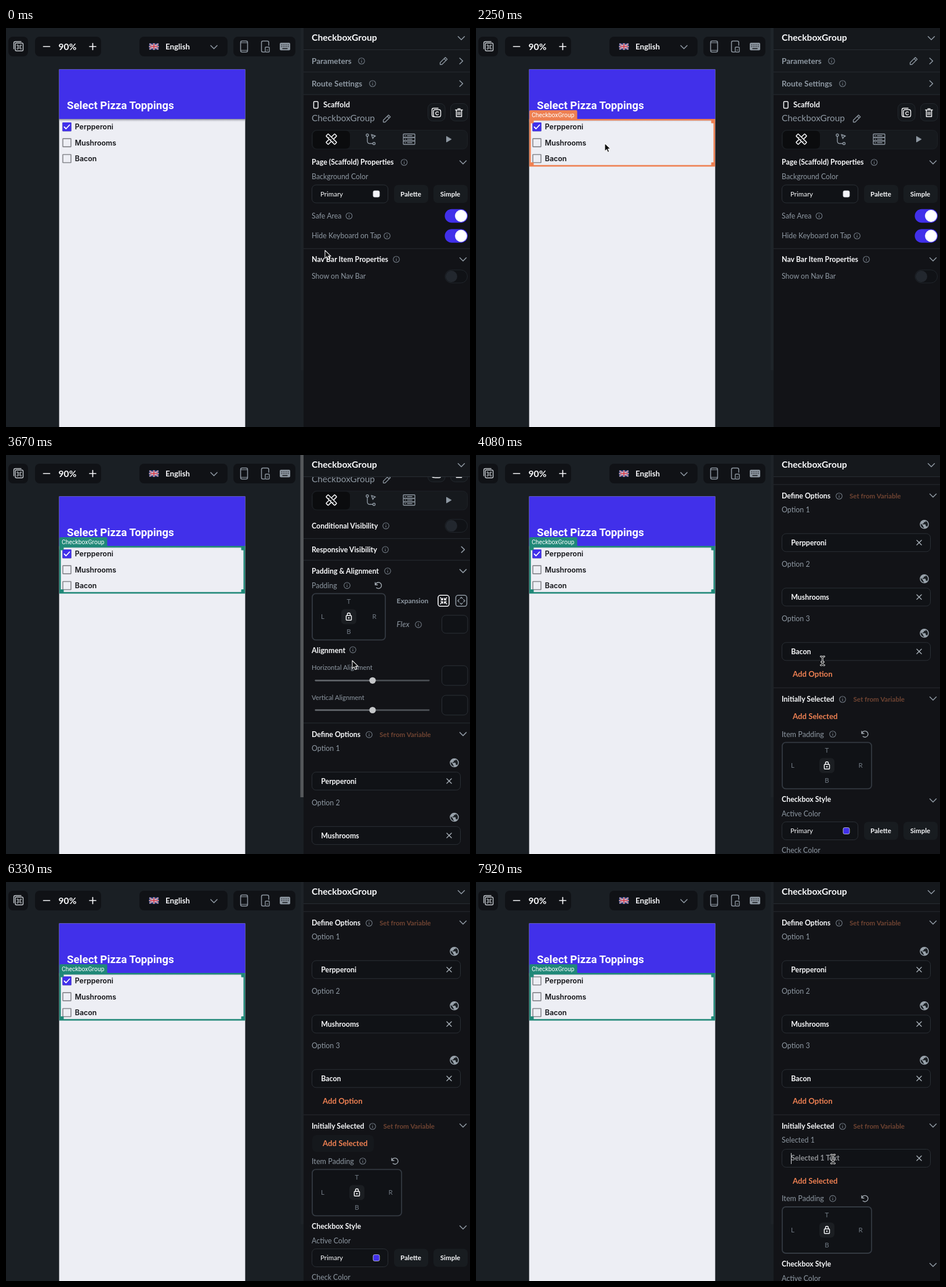
Write an HTML page that moves like this. It is 800 px wide and 689 px high and loops after 8000 ms.

```html
<!DOCTYPE html>
<html lang="en">
<head>
<meta charset="utf-8">
<title>Checkbox group editor</title>
<style>
  html, body { margin: 0; width: 100%; height: 100%; overflow: hidden; background: #1a1f24; }
  svg { display: block; width: 100vw; height: 100vh; }
  text { font-family: Lato, sans-serif; white-space: pre; }
  .bold { font-weight: 700; }
  .italic { font-style: italic; }
  .title { font-family: Roboto, sans-serif; font-weight: 700; }
  .tag { font-family: Roboto, sans-serif; }
  .item { font-family: Inter, sans-serif; font-weight: 600; }
</style>
</head>
<body>
<svg id="stage" viewBox="0 0 800 689" preserveAspectRatio="none"></svg>
<script>
const LOOP = 8000, STEP = 1000 / 12;
const WHITE = '#f8f9fb', GRAY = '#8e98a2', DIM = '#727b85', LINE = '#282d33';
const BLUE = '#4130ea', ORANGE = '#ee8052', TEAL = '#208878';
const PANEL = '#121317', DARK = '#101216', RAISED = '#181c20';

// Drawing helpers; text is placed by its left edge and vertical middle.
const text = (x, y, s, size, fill = WHITE, cls = 'bold', anchor = 'start') =>
  `<text x="${x}" y="${y + size * .355}" font-size="${size}" fill="${fill}" class="${cls}" text-anchor="${anchor}">${s}</text>`;
const box = (x, y, w, h, r = 0, fill = 'none', stroke = 'none', sw = 1) =>
  `<rect x="${x}" y="${y}" width="${w}" height="${h}" rx="${r}" fill="${fill}" stroke="${stroke}" stroke-width="${sw}"/>`;
const dot = (x, y, r, fill, stroke = 'none', sw = 1) =>
  `<circle cx="${x}" cy="${y}" r="${r}" fill="${fill}" stroke="${stroke}" stroke-width="${sw}"/>`;
const path = (d, stroke = GRAY, sw = 1.4, fill = 'none') =>
  `<path d="${d}" stroke="${stroke}" stroke-width="${sw}" fill="${fill}" stroke-linecap="round" stroke-linejoin="round"/>`;
const group = (id, inner) => `<g id="${id}">${inner}</g>`;
const at = (x, y, inner, more = '') => `<g transform="translate(${x} ${y}) ${more}">${inner}</g>`;

const heading = (x, y, s) => text(x, y, s, 12.4);
const label = (x, y, s, size = 12.4) => text(x, y, s, size, GRAY, '');
const rule = y => box(513, y - .5, 287, 1, 0, LINE);
const chevronDown = (x, y, c = GRAY) => path(`M${x - 5.5} ${y - 2.7}l5.5 5.5l5.5-5.5`, c, 1.6);
const chevronRight = (x, y) => path(`M${x - 2.7} ${y - 5}l5.2 5l-5.2 5`, GRAY, 1.6);
const info = (x, y) => dot(x, y, 5.3, 'none', DIM, 1.1) + path(`M${x} ${y - .3}v2.6M${x} ${y - 2.5}v.1`, DIM, 1.2);
const pencil = (x, y) => at(x, y, path('M-6 6v-3.2L3-6.2L6.2-3L-2.8 6ZM1-4L4-1', GRAY, 1.3));
const cross = (x, y) => path(`M${x - 4} ${y - 4}l8 8m0-8l-8 8`, '#aab2ba', 1.4);
const undo = (x, y) => at(x, y, path('M-5.5-5v4h4M-5-1.4A5.3 5.3 0 1 1-3.3 4', '#a4acb4', 1.4));
const field = (x, y, w, h) => box(x + .5, y + .5, w - 1, h - 1, 7, DARK, '#2b3036');
const globe = (x, y) => dot(x, y, 7.8, '#98a2ab') + at(x, y,
  path('M-1 8C-5 7.5-8 4-8 0L-7.8-1.8L-3 3V4Q-3 6-1 6ZM5.9 5.4Q5.400 4 4 4H3V1Q3 0 2 0H-4V-2H-2Q-1-2-1-3V-5H1Q3-5 3-7V-7.400C6-6.200 8-3.300 8 0Q8 3 5.900 5.400Z', 'none', 0, '#1b1f23'), 'scale(.78)');
const lock = (x, y) => box(x - 13, y - 13, 26, 26, 6, '#1b1e22') +
  at(x, y, box(-4.5, -2, 9, 8, 1, 'none', WHITE, 1.5) + path('M-2.5-2V-4a2.5 2.5 0 0 1 5 0V-2', WHITE, 1.4) + dot(0, 2, 1.2, WHITE));
const toggle = (y, on) => on
  ? box(756.5, y - 11.7, 39.5, 23.4, 11.7, BLUE) + dot(784.5, y, 10.4, '#fff')
  : box(757, y - 11.2, 38.5, 22.4, 11.2, DARK, '#21262c') + dot(768, y, 10, '#22272e');
const colorRow = (y, swatch) => field(527, y - 16, 132, 32) + text(542, y, 'Primary', 11.5, WHITE, '') +
  box(633, y - 5.5, 11, 11, 2.5, swatch, '#d0d3da', .8) +
  [[669, 'Palette'], [737, 'Simple']].map(([x, s]) =>
    box(x, y - 15.5, 59, 31, 7, RAISED) + text(x + 29, y, s, 11.5, WHITE, 'bold', 'middle')).join('');
const paddingBox = (y, w) => {
  const mid = 528 + w / 2, letter = (x, dy, s) => text(x, y + dy, s, 11.5, DIM, '', 'middle');
  return box(528, y - 40, w, 80, 6, DARK, '#343a42', 1.8) + lock(mid, y) +
    letter(mid, -26, 'T') + letter(mid, 26, 'B') + letter(546, 0, 'L') + letter(509 + w, 0, 'R');
};
const slider = y => path(`M534 ${y}H729`, '#484c51', 2.8) + path(`M534 ${y}H632`, '#5c6065', 2.8) +
  dot(632, y, 5.6, '#c5c7c9') + field(751, y - 26, 45.5, 35);
const sectionLink = (x, y) => text(x, y, 'Set from Variable', 11.6, '#704432');

function toolbar() {
  const bar = (x, w) => box(x, 15, w, 34, 8, DARK);
  const command = path('M-2-2h4v4h-4ZM-2-2h-1.4a1.4 1.4 0 1 1 1.4-1.4ZM2-2v-1.4a1.4 1.4 0 1 1 1.4 1.4ZM2 2h1.4a1.4 1.4 0 1 1-1.4 1.4ZM-2 2v1.4a1.4 1.4 0 1 1-1.4-1.4Z', '#c6cbd0', 1.1);
  const stripes = (d, white, red) => path(d, '#e4e4ea', white) + path(d, '#cf2f41', red);
  const flag = box(-9, -6, 18, 12, 1, '#283b82') + stripes('M-7.500-4.700L7.500 4.700M7.500-4.700L-7.500 4.700', 2.2, .9) +
    stripes('M0-4.500V4.500M-7.500 0H7.500', 3.400, 1.800);
  return bar(4, 34) + bar(50, 114) + bar(230, 152) + bar(392, 107) +
    path('M13.5 36V26q0-2.5 2.5-2.5H26', '#c6cbd0') + box(16, 26, 13.5, 13.5, 2, DARK, '#c6cbd0', 1.4) + at(22.8, 32.8, command, 'scale(.82)') +
    path('M64.5 32h11M144 32h11M149.5 26.5v11', WHITE, 1.7) + text(90.5, 32, '90%', 15.7) +
    at(255, 32, flag, 'scale(.92)') + text(275, 32, 'English', 13.3) + chevronDown(358.5, 33) +
    box(404.5, 22.5, 12, 19, 2.5, 'none', GRAY, 1.5) + path('M405 25.5h11M405 38.5h11', GRAY, 1) +
    path('M446 41.5h-3q-2.5 0-2.5-2.5V25q0-2.5 2.5-2.5h7.5q2.5 0 2.5 2.5V30', GRAY, 1.5) +
    box(447, 33, 7, 8.5, 1, 'none', GRAY, 1.4) + path('M450 38h1') +
    box(472, 25.5, 18, 13, 2, GRAY) +
    [29, 32].map(y => [475, 478, 481, 484, 487].map(x => dot(x, y, .8, DARK)).join('')).join('') + path('M477 35.5h8', DARK);
}

function phone() {
  const rows = ['Perpperoni', 'Mushrooms', 'Bacon'].map((s, i) => {
    const y = 170.7 + i * 27.4;
    return box(98, y - 7, 14, 14, .5, 'none', '#85868c', 1.6) + text(118.7, y, s, 12.45, '#111216', 'item');
  }).join('');
  const check = box(97.3, 163, 15.3, 15.3, 1, BLUE) + path('M100.5 171l3 3l6-6.5', '#fff', 1.8);
  return box(91.6, 71.5, 320.8, 618, 0, '#edeef4') +
    box(91.6, 157, 320.8, 6, 0, 'url(#shade)') +
    box(91.6, 71.5, 320.8, 85.5, 0, BLUE) + text(105, 133.3, 'Select Pizza Toppings', 18.7, '#fff', 'title') +
    rows + group('check', check);
}

function outline(id, name, color, height, tagWidth) {
  const bottom = 158.4 + height;
  const corners = [[94, 159], [405.5, 159], [94, bottom - 6], [405.5, bottom - 6]]
    .map(([x, y]) => box(x, y, 5.5, 5.5, 1, color)).join('');
  return group(id, box(93.2, 158.4, 317.6, height, 0, 'none', color, 2.7) + corners +
    box(92, 142, tagWidth, 17, 2, color) + text(96, 150, name, 10.4, '#fff', 'tag'));
}

function panelTop() {
  const button = x => box(x + .5, 130.5, 29.5, 30, 8, '#14171b', '#24292f');
  const ruler = box(-2.6, -10.5, 5.2, 21, 1, 'none', WHITE, 1.6);
  return box(513, 38, 287, 77, 0, '#15181c') + text(527, 57, 'Parameters', 13.6, GRAY) + info(613, 57) + pencil(754.5, 57) + chevronRight(785, 57) +
    rule(76) + text(527, 96, 'Route Settings', 13.5, GRAY) + info(632, 96) + chevronRight(785, 96) + rule(115) +
    box(530.5, 127, 7.5, 11.5, 1.5, 'none', WHITE, 1.5) +
    label(527, 156, 'CheckboxGroup', 15.4) + pencil(656.5, 156.5) +
    button(727) + button(766) +
    at(742, 146, path('M-4.5 7h-1q-2-.5-2-2.5V-5q0-2.5 2.5-2.5H3', WHITE) + box(-5, -5, 12.5, 12.5, 3, 'none', WHITE, 1.4) + path('M3.5-.5a2.7 2.7 0 1 0 0 3.6', WHITE)) +
    at(781, 146, path('M-6-4.5H6M-2-6.5H2M-4.5-4V7H4.5V-4M-1.5-1V4M1.5-1V4', WHITE, 1.6)) +
    box(527.5, 176.5, 268, 32.5, 8, '#16191d', '#1d2126') + box(529, 177.5, 64, 31, 7, '#0b0c0e') +
    at(561, 192, ruler, 'rotate(45)') +
    at(561, 192, box(-3.3, -11, 6.6, 22, 0, '#0b0c0e') + ruler + path('M-2.5-5h2M-2.5 0h2M-2.5 5h2', WHITE, 1.1), 'rotate(-45)') +
    at(629, 192, dot(-6, -7, 2, 'none', GRAY, 1.4) + dot(5.5, 7.5, 2, 'none', GRAY, 1.4) +
      path('M-6-5V3q0 4 3.5 4.5H3M1-8l7 2.5l-3 1.5l-1.5 3Z')) +
    at(695, 192, [-9, -3, 3].map(y => box(-10, y, 20, 6, 1, 'none', GRAY, 1.4) + path(`M-7 ${y + 3}h1M-3 ${y + 3}h8`)).join('')) +
    path('M759.5 187.5v9.5l8-4.75Z', GRAY, 1, GRAY);
}

function pageProperties() {
  return text(547, 132.5, 'Scaffold', 12.8) +
    heading(527, 232, 'Page (Scaffold) Properties') + info(686.5, 232) + chevronDown(788, 232) +
    label(527, 257, 'Background Color') + colorRow(286.5, '#f3f4f8') +
    label(527, 324.5, 'Safe Area') + info(591.5, 324.5) + toggle(324.5, true) +
    label(527, 359, 'Hide Keyboard on Tap') + info(657, 359) + toggle(359, true) + rule(381) +
    heading(527, 399.5, 'Nav Bar Item Properties') + info(673, 399.5) + chevronDown(788, 399.5) +
    label(527, 429, 'Show on Nav Bar') + toggle(429, false);
}

function layoutSection() {
  const fourWay = (x, c, d) => box(x - 9.5, 242.5, 19, 19, 4, 'none', c, 1.6) +
    [0, 90, 180, 270].map(a => at(x, 252, path(d, c, 1.5), `rotate(${a})`)).join('');
  return heading(527, 122.5, 'Conditional Visibility') + info(655, 122.5) + toggle(122.5, false) + rule(144.5) +
    heading(527, 163.5, 'Responsive Visibility') + info(654, 163.5) + chevronRight(788, 163.5) + rule(182) +
    heading(527, 200.5, 'Padding &amp; Alignment') + info(658, 200.5) + chevronDown(788, 200.5) +
    label(527, 225.5, 'Padding') + info(588, 225.5) + undo(642, 225.5) + paddingBox(279.5, 126) +
    text(673.5, 251.5, 'Expansion', 12, GRAY) +
    fourWay(754.5, WHITE, 'M-5.5-5.5L-1.7-1.7M-4.5-1.5h3V-4.5') + fourWay(785, GRAY, 'M-2-4l2-2l2 2') +
    text(673.5, 293, 'Flex', 13, GRAY, 'italic') + info(711, 293) + field(751, 276.5, 45.5, 32) +
    text(527, 337.5, 'Alignment', 12.7) + info(598, 336.5) +
    label(527, 367.5, 'Horizontal Alignment', 11.3) + slider(389.5) +
    label(527, 419, 'Vertical Alignment', 11.3) + slider(440.7);
}

function optionsSection() {
  const input = (y, s, color) => field(527, y - 16, 257, 32) + text(543.2, y, s, 12.4, color) + cross(764, y);
  const options = ['Perpperoni', 'Mushrooms', 'Bacon'].map((s, i) =>
    at(0, i * 94, label(527, 95, 'Option ' + (i + 1)) + globe(773, 119.7) + input(151.3, s))).join('');
  const rest = group('hover', box(528, 437, 106, 29, 7, '#15181c')) + text(546, 451.5, 'Add Selected', 13.2, ORANGE) +
    label(527, 482, 'Item Padding', 12.7) + info(615, 482) + undo(670.5, 482) + paddingBox(536.3, 154) +
    heading(527, 595, 'Checkbox Style') + chevronDown(788, 596.5) + label(527, 620, 'Active Color') +
    colorRow(649, BLUE) + label(527, 682.5, 'Check Color');
  return rule(51) + heading(527, 71, 'Define Options') + info(626, 71) + sectionLink(644, 71) + chevronDown(788, 70) +
    options + text(546, 378.5, 'Add Option', 13.2, ORANGE) + rule(402) +
    heading(527, 422, 'Initially Selected') + info(632, 422) + sectionLink(650.5, 422) + chevronDown(788, 420.5) +
    group('selected', label(527, 446, 'Selected 1') + input(477, 'Selected 1 Text', '#8f9296') +
      group('caret', box(543, 468, 1, 19, 0, '#d5d7da'))) +
    group('rest', rest);
}

document.getElementById('stage').innerHTML = `
  <defs>
    <linearGradient id="shade" x2="0" y2="1"><stop stop-color="#777886" stop-opacity=".9"/><stop offset="1" stop-color="#edeef4" stop-opacity="0"/></linearGradient>
    <clipPath id="body"><rect x="513" y="38" width="287" height="651"/></clipPath>
  </defs>` +
  box(0, 0, 800, 689, 0, '#1a1f24') + toolbar() + phone() +
  outline('column', 'Column', ORANGE, 560, 43) +
  outline('hovered', 'CheckboxGroup', ORANGE, 79.6, 82.5) +
  outline('picked', 'CheckboxGroup', TEAL, 79.6, 82.5) +
  box(508, 0, 5, 591, 0, '#1e2328') + group('bar', box(507.5, 0, 5.5, 591, 0, '#54575a')) +
  box(513, 0, 287, 689, 0, PANEL) +
  `<g clip-path="url(#body)">` + group('scroll', panelTop() + group('page', pageProperties()) +
    group('widget', text(547, 132.5, 'CheckboxGroup', 12.5) + at(0, 114, layoutSection()) + at(0, 526, optionsSection()))) + '</g>' +
  box(513, 0, 287, 37, 0, '#15181c') + rule(37.5) + text(527, 16.5, 'CheckboxGroup', 15.7) + chevronDown(785, 17.5) +
  group('arrow', path('M0 0V13.8l3.2-3l2.1 4.8l2.5-1.1l-2.1-4.6h4.4Z', '#f4f4f4', 1.1, '#08090a')) +
  group('beam', ['#f4f4f4', '#08090a'].map((c, i) =>
    path('M-3-7.5q3 0 3 2q0-2 3-2M0-5.5V5.5M-3 7.5q3 0 3-2q0 2 3 2M-2 2H2', c, i ? 1.1 : 2.8)).join(''));

const part = {};
document.querySelectorAll('g[id]').forEach(g => part[g.id] = g);
const show = (name, on) => part[name].setAttribute('visibility', on ? 'inherit' : 'hidden');
const move = (name, x, y) => part[name].setAttribute('transform', `translate(${x} ${y})`);
const clamp = v => Math.min(1, Math.max(0, v));
const progress = (t, from, to) => clamp((t - from) / (to - from));
const smooth = k => k * k * (3 - 2 * k);
const cubic = k => k < .5 ? 4 * k ** 3 : 1 - 4 * (1 - k) ** 3;

// Pointer stops: time, x, y.
const stops = [[0, 550, 384], [920, 550, 384], [1500, 287, 313], [1750, 287, 313], [2250, 222, 199], [2600, 222, 199],
  [3330, 597, 355], [4250, 597, 355], [4450, 598, 368], [4670, 598, 368], [5300, 588, 452], [6950, 588, 452], [7600, 615, 478], [LOOP, 615, 478]];
function pointer(t) {
  const i = stops.findIndex(s => s[0] > t), [t0, x0, y0] = stops[i - 1], [t1, x1, y1] = stops[i];
  const k = smooth(progress(t, t0, t1));
  return [x0 + (x1 - x0) * k, y0 + (y1 - y0) * k];
}

function render(t) {
  const [x, y] = pointer(t);
  const picked = t >= 2420, added = t >= 6700;
  const within = (from, to) => t >= from && t < to;

  show('column', within(1220, 2050));
  show('hovered', within(2050, 2420));
  show('picked', picked);
  show('page', !picked);
  show('widget', picked);
  move('scroll', 0, -526 * cubic(progress(t, 3413, 4083)));

  const barFade = t < 3090 ? progress(t, 1950, 2260) : progress(t, 3720, 3980);
  part.bar.setAttribute('opacity', t < 1060 ? 0 : 1 - barFade);

  show('hover', within(5160, 6700));
  show('selected', added);
  show('caret', t >= 7650);
  show('check', !added);
  move('rest', 0, added ? 64.7 : 0);

  const beam = within(4000, 4300) || (t > 6950 && y > 461);
  const visible = !within(5200, 6900);
  show('arrow', visible && !beam);
  show('beam', visible && beam);
  move('arrow', x, y);
  move('beam', x + .5, y + .5);
}

function tick() {
  const t = performance.now() % LOOP;
  render(Math.min(Math.floor((t + 5) / STEP) * STEP, LOOP - STEP));
  requestAnimationFrame(tick);
}
tick();
</script>
</body>
</html>
```
